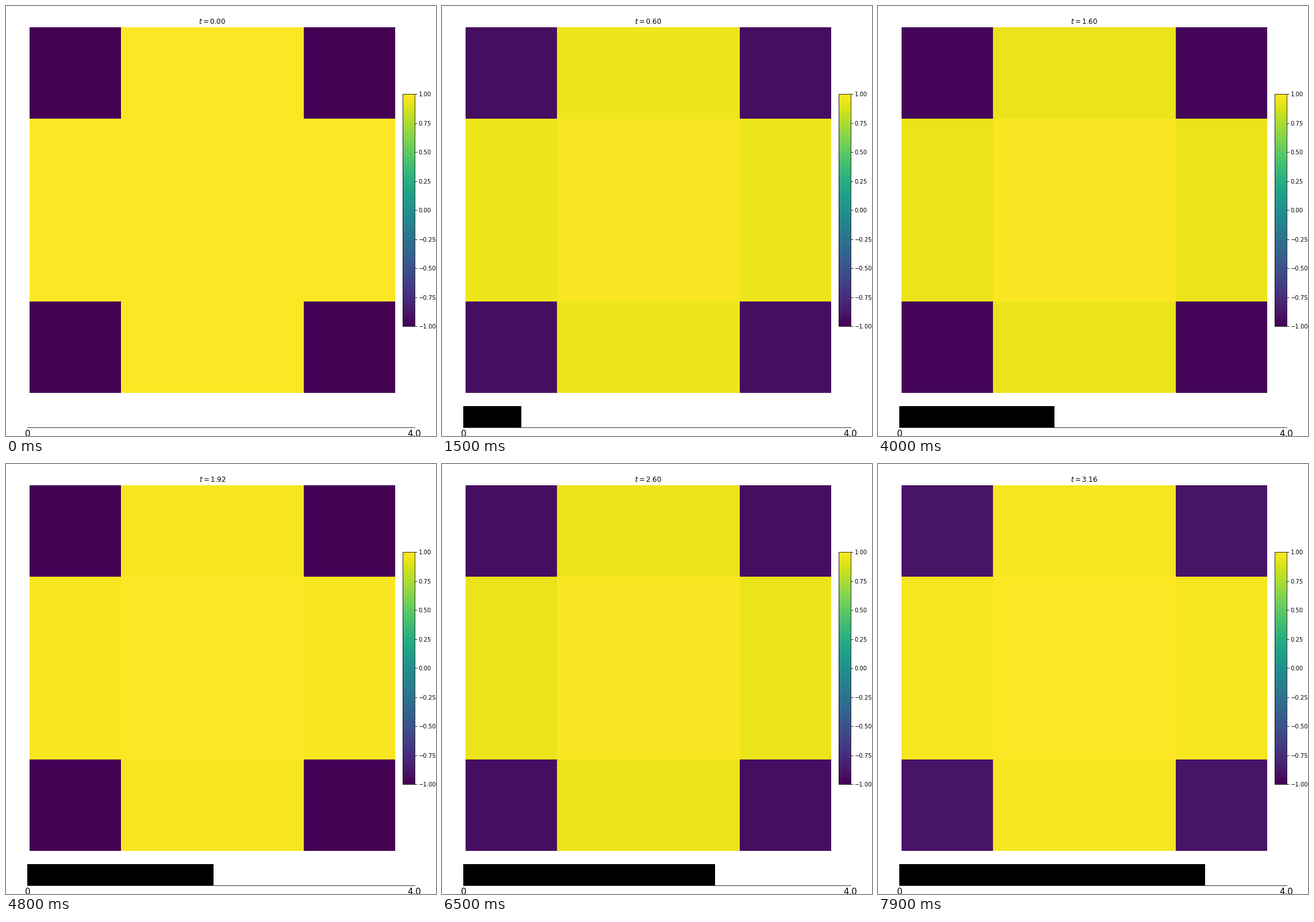
A matplotlib script for the animation above (8 s loop, 748x748 px).

```python
import numpy as np
import matplotlib.pyplot as plt
from matplotlib.animation import FuncAnimation

SIZE, DPI = 748, 72
FRAMES, INTERVAL = 80, 100
DT, T_MAX = 0.04, 4.0

plt.rcParams["font.family"] = "DejaVu Sans"
plt.rcParams["mathtext.fontset"] = "dejavusans"


def swing(t, period):
    """Smooth 0 to 1 to 0 oscillation."""
    return np.sin(np.pi * t / period) ** 2


def lattice(t):
    """Mean spins on a 4 x 4 grid whose corners start flipped."""
    edge = 1 - 0.02 * (1 - np.exp(-4 * t)) - 0.04 * swing(t, 1)
    grid = np.full((4, 4), edge)
    grid[1:3, 1:3] = 1 - 0.015 * swing(t, 1)
    grid[::3, ::3] = -1 + 0.11 * swing(t, 2)
    return grid


fig = plt.figure(figsize=(SIZE / DPI, SIZE / DPI), dpi=DPI, facecolor="white")

# Spin lattice
ax = fig.add_axes([0.055, 0.1, 0.85, 0.85])
ax.axis("off")
image = ax.imshow(lattice(0), cmap="viridis", vmin=-1, vmax=1,
                  interpolation="nearest")
title = ax.set_title("", fontsize=12, pad=6, y=1)

# Colour bar
cax = fig.add_axes([0.923, 0.255, 0.027, 0.54])
cbar = fig.colorbar(image, cax=cax, ticks=np.linspace(-1, 1, 9),
                    format=lambda v, _: f"{v:.2f}".replace("-", "\u2212"))
cbar.ax.tick_params(labelsize=10)

# Progress bar
prog = fig.add_axes([0.05, 0.02, 0.9, 0.05])
prog.set_xlim(0, T_MAX)
prog.set_ylim(0, 1)
prog.patch.set_visible(False)
prog.spines[["left", "right", "top"]].set_visible(False)
prog.set_yticks([])
prog.set_xticks([0, T_MAX], ["0", "4.0"])
prog.tick_params(axis="x", length=0, labelsize=15)
bar = prog.barh(0.5, 0, height=1, color="black", linewidth=0)[0]


def update(k):
    t = k * DT
    image.set_data(lattice(t))
    title.set_text(f"$t = {t:.2f}$")
    bar.set_width(t)
    return image, title, bar


anim = FuncAnimation(fig, update, frames=FRAMES, interval=INTERVAL,
                     repeat=True, repeat_delay=0, blit=False)
plt.show()
```
